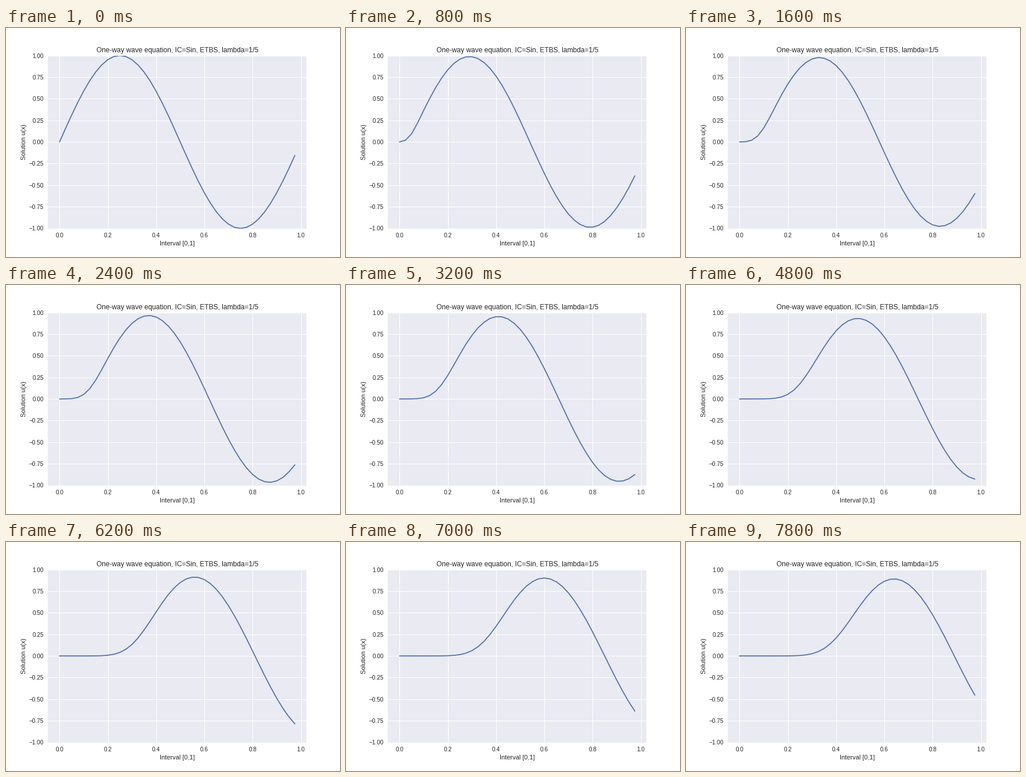
A matplotlib script for the animation above (8000 ms loop, 576 by 396 pixels).

```python
import numpy as np
import matplotlib.pyplot as plt
from matplotlib.animation import FuncAnimation

POINTS = 40
FRAMES = 40
COURANT = 0.4
INK = "#262626"

plt.rcParams.update({
    "font.family": "Liberation Sans",
    "text.color": INK,
    "axes.labelcolor": INK,
    "axes.facecolor": "#EAEAF2",
    "axes.axisbelow": True,
    "grid.color": "white",
    "grid.linewidth": 1,
    "lines.solid_capstyle": "round",
})


def solve(u, steps):
    """Explicit time, backward space scheme with the left end held fixed."""
    rows = [u]
    for _ in range(steps - 1):
        u = u.copy()
        u[1:] -= COURANT * (u[1:] - u[:-1])
        rows.append(u)
    return rows


x = np.arange(POINTS) / POINTS
waves = solve(np.sin(2 * np.pi * x), FRAMES)

fig = plt.figure(figsize=(8, 5.5), dpi=72, facecolor="white")
ax = fig.add_axes([0.125, 0.125, 0.775, 0.755])
line, = ax.plot(x, waves[0], color="#4C72B0", lw=1.75)

margin = 0.05 * x[-1]
ax.set_xlim(-margin, x[-1] + margin)
ax.set_ylim(-1, 1)
ax.set_xticks(np.linspace(0, 1, 6))
ax.set_yticks(np.linspace(-1, 1, 9))
ax.grid(True)
ax.tick_params(length=0, pad=7, labelsize=10, labelcolor=INK)
for spine in ax.spines.values():
    spine.set_visible(False)

ax.set_title("One-way wave equation, IC=Sin, ETBS, lambda=1/5", fontsize=12, pad=6)
ax.set_xlabel("Interval [0,1]", fontsize=11)
ax.set_ylabel("Solution u(x)", fontsize=11)


def update(frame):
    line.set_ydata(waves[frame])
    return line,


anim = FuncAnimation(fig, update, frames=FRAMES, interval=200, repeat=True)
plt.show()
```
